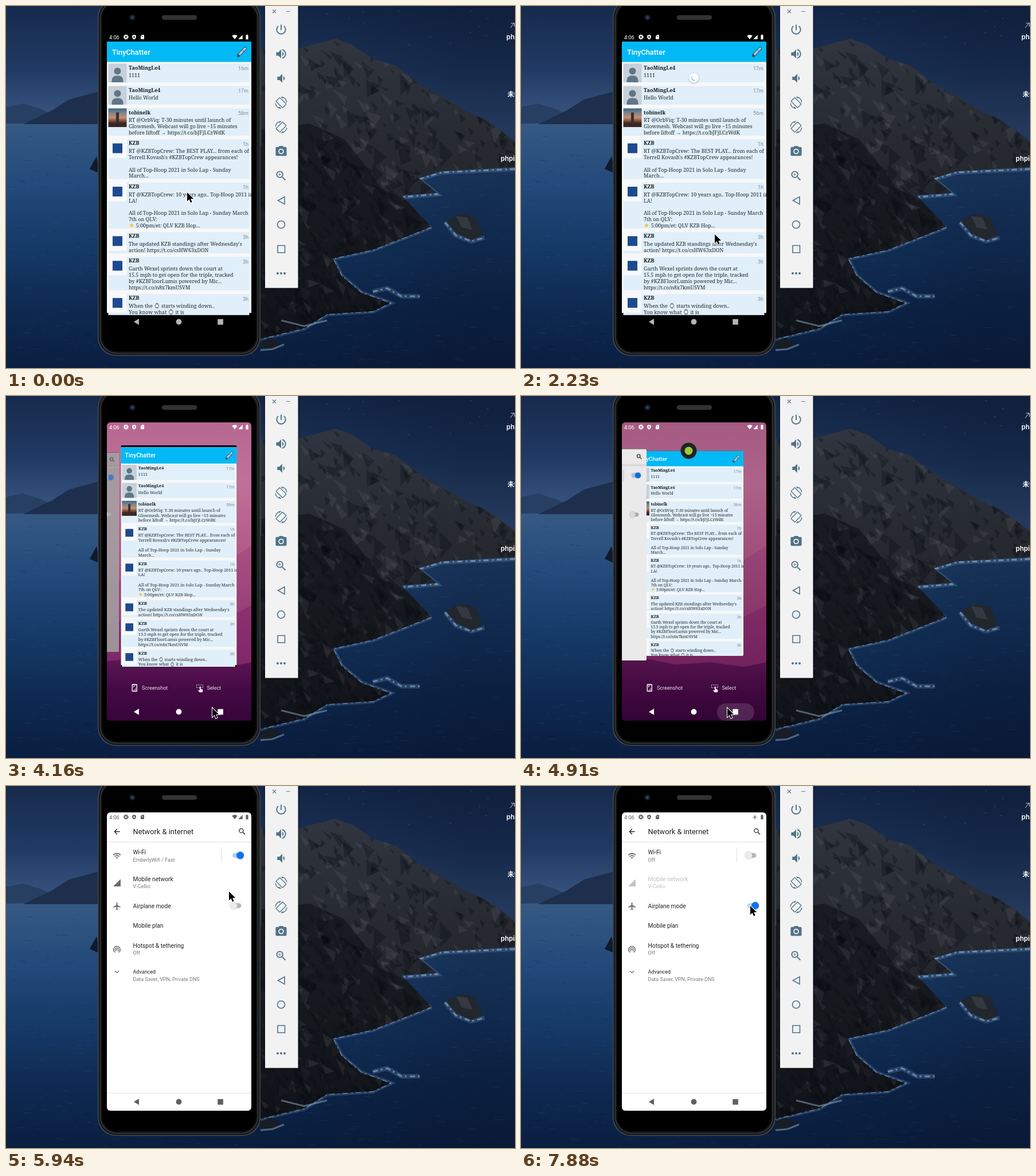
Write an HTML page with a canvas that moves like this. It is 888 px wide and 631 px high and loops after 8 s.

```html
<!DOCTYPE html>
<html lang="en">
<head>
<meta charset="utf-8">
<title>Phone emulator</title>
<style>
html, body { margin: 0; width: 100%; height: 100%; overflow: hidden; background: #0a1f40; }
canvas { display: block; }
</style>
</head>
<body>
<canvas width="888" height="631"></canvas>
<script>
const LOOP = 8000, STEP = 148.3;
const stage = document.querySelector('canvas');
const desktop = new OffscreenCanvas(888, 631);
let g = desktop.getContext('2d');

const SERIF = '"Noto Serif", serif', SANS = 'Roboto, sans-serif';
const ICON = {
  power: 'M13 3h-2v10h2V3zm4.83 2.17l-1.42 1.42C17.99 7.86 19 9.81 19 12c0 3.87-3.13 7-7 7s-7-3.13-7-7c0-2.19 1.01-4.14 2.58-5.42L6.17 5.17C4.23 6.82 3 9.26 3 12c0 4.97 4.03 9 9 9s9-4.03 9-9c0-2.74-1.23-5.18-3.17-6.83z',
  loud: 'M3 9v6h4l5 5V4L7 9H3zm13.5 3c0-1.77-1.02-3.29-2.5-4.03v8.05c1.48-.73 2.5-2.25 2.5-4.02zM14 3.23v2.06c2.89.86 5 3.54 5 6.71s-2.11 5.85-5 6.71v2.06c4.01-.91 7-4.49 7-8.77s-2.99-7.86-7-8.77z',
  quiet: 'M18.5 12c0-1.77-1.02-3.29-2.5-4.03v8.05c1.48-.73 2.5-2.25 2.5-4.02zM5 9v6h4l5 5V4L9 9H5z',
  rotate: 'M16.48 2.52c3.27 1.55 5.61 4.72 5.97 8.48h1.5C23.44 4.84 18.29 0 12 0l-.66.03 3.81 3.81 1.33-1.32zm-6.25-.77c-.59-.59-1.54-.59-2.12 0L1.75 8.11c-.59.59-.59 1.54 0 2.12l12.02 12.02c.59.59 1.54.59 2.12 0l6.36-6.36c.59-.59.59-1.54 0-2.12L10.23 1.75zm4.6 19.44L2.81 9.17l6.36-6.36 12.02 12.02-6.36 6.36zM7.52 21.48C4.25 19.94 1.91 16.76 1.55 13H.05C.56 19.16 5.71 24 12 24l.66-.03-3.81-3.81-1.33 1.32z',
  camera: 'M9 2 7.17 4H4c-1.1 0-2 .9-2 2v12c0 1.1.9 2 2 2h16c1.1 0 2-.9 2-2V6c0-1.1-.9-2-2-2h-3.17L15 2H9zm3 15a5 5 0 1 1 0-10 5 5 0 0 1 0 10zm0-1.8a3.2 3.2 0 1 0 0-6.4 3.2 3.2 0 0 0 0 6.4z',
  search: 'M15.5 14h-.79l-.28-.27A6.47 6.47 0 0 0 16 9.5 6.5 6.5 0 1 0 9.5 16c1.61 0 3.09-.59 4.23-1.57l.27.28v.79l5 4.99L20.49 19l-4.99-5zm-6 0a4.5 4.5 0 1 1 0-9 4.5 4.5 0 0 1 0 9z',
  plus: 'M12 10h-2v2H9v-2H7V9h2V7h1v2h2v1z',
  wifi: 'M1 9l2 2c4.97-4.97 13.03-4.97 18 0l2-2C16.93 2.93 7.08 2.93 1 9zm8 8l3 3 3-3c-1.65-1.66-4.34-1.66-6 0zm-4-4l2 2c2.76-2.76 7.24-2.76 10 0l2-2C15.14 9.14 8.87 9.14 5 13z',
  fan: 'M12 22 0 7a18 18 0 0 1 24 0z',
  signal: 'M2 22h20V2z',
  plane: 'M22 16v-2l-8.5-5V3.5c0-.83-.67-1.5-1.5-1.5s-1.5.67-1.5 1.5V9L2 14v2l8.5-2.5V19L8 20.5V22l4-1 4 1v-1.5L13.5 19v-5.5L22 16z',
  hotspot: 'M12 11a2 2 0 1 0 0 4 2 2 0 0 0 0-4zm6 2a6 6 0 1 0-9 5.19l1-1.74a4 4 0 1 1 4 0l1 1.74A6 6 0 0 0 18 13zM12 3a10 10 0 0 0-5.01 18.65l1-1.73a8 8 0 1 1 8 0l1 1.73A10 10 0 0 0 12 3z',
  back: 'M20 11H7.83l5.59-5.59L12 4l-8 8 8 8 1.41-1.41L7.83 13H20v-2z',
  more: 'M16.59 8.59L12 13.17 7.41 8.59 6 10l6 6 6-6z',
  shield: 'M12 1 3 5v6c0 5.5 3.8 10.7 9 12 5.2-1.3 9-6.5 9-12V5zm0 6 4 5-4 5-4-5z',
  sd: 'M20 2H10L4 8v14h16zM9 7h2v4H9zm4 0h2v4h-2z',
  battery: 'M17 4h-3V2h-4v2H7v18h10z',
  hand: 'M18.84 15.87l-4.54-2.26-1.3-.11v-6a1.5 1.5 0 0 0-3 0v10.74l-3.67-.75-1.58 1.13 4.94 4.94 1.06.44h6.79l1.44-1.28.75-5.27z'
};
const range = n => [...Array(n).keys()];
const shape = (d, color) => { g.fillStyle = color; g.fill(new Path2D(d), 'evenodd'); };
const box = (x, y, w, h, color, r = 0) => {
  g.fillStyle = color; g.beginPath(); g.roundRect(x, y, w, h, r); g.fill();
};
const disc = (x, y, r, color) => box(x - r, y - r, 2 * r, 2 * r, color, r);
const line = (d, color, width = 1) => {
  g.strokeStyle = color; g.lineWidth = width; g.stroke(new Path2D(d));
};
const text = (s, x, y, size, color, font = SANS, weight = 400, align = 'left') => {
  g.font = `${weight} ${size}px ${font}`; g.fillStyle = color; g.textAlign = align;
  g.fillText(s, x, y);
  return g.measureText(s).width;
};
const icon = (name, x, y, size, color, flip = 1) => {
  g.save(); g.translate(x, y); g.scale(flip * size / 24, size / 24); g.translate(-12, -12);
  shape(ICON[name], color); g.restore();
};
const ramp = (y0, y1, ...colors) => {
  const fade = g.createLinearGradient(0, y0, 0, y1);
  colors.forEach((c, i) => fade.addColorStop(i / (colors.length - 1), c));
  return fade;
};
// keys: [step, value, value, ...] with straight runs between them
const track = (n, keys) => {
  const i = keys.findIndex(k => k[0] > n);
  if (i < 0) return keys.at(-1).slice(1);
  const a = keys[Math.max(i - 1, 0)], b = keys[i], u = Math.max(0, (n - a[0]) / (b[0] - a[0]));
  return a.slice(1).map((v, j) => v + (b[j + 1] - v) * u);
};

let seed = 7;
const rnd = (a, b) => (seed = seed * 16807 % 2147483647, a + (b - a) * seed / 2147483647);

function facets(path, count, y0, y1) {
  g.save(); g.clip(new Path2D(path));
  for (const i of range(count)) {
    const x = rnd(440, 888), y = rnd(y0, y1), s = rnd(6, 26);
    shape(`M${x} ${y}l${s} ${rnd(4, s)} ${-rnd(2, s)} ${rnd(3, s)}z`,
      i % 3 ? 'rgba(5,9,16,.28)' : 'rgba(125,125,135,.14)');
  }
  g.restore();
}

function drawDesktop() {
  const shore = '742 385 640 425 570 440 585 470 620 500 670 518 640 532 560 537 520 562 444 580';
  const ridge = `M444 75 509 74 540 66 575 57 605 68 640 92 680 104 720 135 765 160 800 182 840 200 888 236V281L760 288 720 300 752 326 690 330 ${shore}Z`;
  const cliff = `M444 215 530 205 590 232 630 282 655 318 700 340 ${shore}Z`;
  const islet = 'M767 374 795 362 818 368 832 400 812 408 785 396Z';
  box(0, 0, 888, 300, ramp(0, 215, '#162a4c', '#213a63', '#3d5a86'));
  shape('M0 176 30 170 62 180 82 190 60 204 0 205Z', '#263f63');
  shape('M30 206 80 182 110 163 165 148V216H100Z', '#1d2f4c');
  const sea = ramp(200, 631, '#375a84', '#234a7a', '#163a68', '#0e2a51', '#0a1e40');
  box(0, 206, 450, 425, sea);
  box(440, 275, 448, 356, sea);
  const shade = g.createLinearGradient(250, 0, 800, 0);
  shade.addColorStop(0, 'rgba(8,20,44,0)'); shade.addColorStop(1, 'rgba(8,20,44,.48)');
  box(0, 0, 888, 631, shade);
  for (const i of range(650)) {
    const y = rnd(225, 631), x = rnd(0, 888), w = rnd(3, 14);
    if (x < 450 || y > 300) box(x, y, w, 1, i % 2 ? 'rgba(110,150,195,.11)' : 'rgba(3,14,36,.16)');
  }
  for (const i of range(14)) box(rnd(520, 880), rnd(3, 70), 1, 1, 'rgba(210,220,240,.5)');

  const surf = ['M888 284 760 290 720 302 752 328 692 333', 'M' + shore, 'M766 377 785 400 812 410 835 404', 'M640 498 665 492 690 506 722 506'];
  for (const d of surf) {
    line(d, 'rgba(105,145,185,.28)', 8);
    g.setLineDash([9, 5, 3, 6]); line(d, 'rgba(165,190,215,.55)', 3); g.setLineDash([]);
  }
  shape(ridge, ramp(60, 580, '#30353f', '#272a31', '#202329', '#14181f'));
  facets(ridge, 650, 60, 580);
  shape(cliff, 'rgba(13,15,20,.55)');
  facets(cliff, 420, 205, 580);
  shape(islet, '#22262d');
  shape('M785 366 805 369 814 390 795 386Z', '#333841');
  shape('M444 585 462 578 480 588 462 599 444 596Z', '#171c25');
  line('M444 600 465 598 485 590M480 548 520 558 560 548', 'rgba(160,188,212,.45)', 3);
  shape('M146 284 158 262 164 292Z', '#101a2a');

  const label = (s, x, y) => text(s, x, y, 11.5, '#fff', 'Inter, "Noto Sans CJK SC", sans-serif', 600);
  label('ph', 873, 58); label('未命', 875, 158); label('phpi', 863, 270);
  line('M880 38 886 30M881 30h6v6', '#c9ced6');
  drawPhoneBody();
  drawToolbar();
}

function drawPhoneBody() {
  box(443, 128, 2.5, 28, '#34373b', 1);
  box(443, 188, 2.5, 56, '#34373b', 1);
  box(160, -12, 284, 622, '#46494e', 32);
  box(161.5, -11, 281, 619.5, '#17191c', 31);
  box(164, -8, 276, 614, '#34373b', 29);
  box(165.5, -7, 273, 611.5, '#0e0f11', 28);
  box(168, -5, 268, 607, '#000', 26);
  box(272, 16, 61, 8, '#343132', 4);
  disc(220.5, 20, 5, '#18202b'); disc(220.5, 20, 2.2, '#30465e');
}

function drawToolbar() {
  const ink = '#4f7388';
  g.shadowColor = 'rgba(0,0,0,.4)'; g.shadowBlur = 5;
  box(452, -5, 57.5, 496.5, '#f2f2f3');
  g.shadowBlur = 0; g.shadowColor = 'transparent';
  line('M465 6.5l6 6m0-6-6 6M489 9.5h7', '#64808f', 1.2);
  ['power', 'loud', 'quiet', 'rotate', 'rotate', 'camera', 'search'].forEach((name, i) =>
    icon(name, 480, 41 + 42.5 * i, i == 3 || i == 4 ? 21 : 23, ink, i == 4 ? -1 : 1));
  icon('plus', 480, 296, 23, ink);
  line('M474.5 339 486 332.5V345.5ZM486.5 381a6.5 6.5 0 1 0-13 0 6.5 6.5 0 0 0 13 0M474 417.5h12.5v12.5H474z', ink, 1.6);
  for (const x of [474, 480, 486]) disc(x, 466, 2, ink);
}

function statusBar(color, airplane) {
  text('4:06', 180, 57.5, 9.2, color);
  g.setLineDash([1.5, 1.1]);
  line('M213 54a3.7 3.7 0 1 0-7.4 0 3.7 3.7 0 0 0 7.4 0', color, 1.6);
  g.setLineDash([]);
  line('M211.7 54a2.4 2.4 0 1 0-4.8 0 2.4 2.4 0 0 0 4.8 0', color, 1.6);
  icon('shield', 223.5, 54, 9, color);
  icon('sd', 238, 54, 9, color);
  if (airplane) icon('plane', 408, 54, 9, color);
  else { icon('fan', 399, 54, 9.5, color); icon('signal', 409, 54, 9, color); }
  icon('battery', 420.5, 54, 10, color);
}

function navBar(color) {
  shape('M223 550.5 232 545V556Z', color);
  disc(301.5, 550.5, 4.9, color);
  box(369.3, 545.8, 9.6, 9.6, color, .5);
}

const AVATARS = {
  person(y) {
    box(178.5, y, 32, 32.5, '#c7d1d9');
    g.save(); g.beginPath(); g.rect(178.5, y, 32, 32.5); g.clip();
    disc(194.5, y + 13, 6, '#5f7688');
    box(184.5, y + 21, 20, 20, '#5f7688', 8);
    g.restore();
  },
  photo(y) {
    box(178.5, y, 32, 32.5, ramp(y, y + 32, '#3c6788', '#7d8590', '#c98d6b', '#5a3a33', '#33231f'));
    box(192, y + 7, 5, 20, '#3a302f');
    box(179, y + 25, 31, 7, '#3c2823');
  },
  team(y) {
    box(178.5, y, 32, 32.5, '#f7f9fb');
    box(186, y + 7, 17, 17, '#1d4a8f');
  }
};
const POSTS = [
  ['TaoMingLe4', 'person', '17m', '1111'],
  ['TaoMingLe4', 'person', '17m', 'Hello World'],
  ['tobinelk', 'photo', '56m', 'RT @OrbViq: T-30 minutes until launch of', 'Glowmesh. Webcast will go live ~15 minutes', 'before liftoff → https://t.co/bJFjLCzWdK'],
  ['KZB', 'team', '1h', 'RT @KZBTopCrew: The BEST PLAY... from each of', "Terrell Kovash's #KZBTopCrew appearances!", '', 'All of Top-Hoop 2021 in Solo Lap - Sunday', 'March...'],
  ['KZB', 'team', '1h', 'RT @KZBTopCrew: 10 years ago.. Top-Hoop 2011 in', 'LA!', '', 'All of Top-Hoop 2021 in Solo Lap - Sunday March', '7th on QLV:', '★ 5:00pm/et: QLV KZB Hop...'],
  ['KZB', 'team', '3h', "The updated KZB standings after Wednesday's", 'action! https://t.co/csHW63xDON'],
  ['KZB', 'team', '3h', 'Garth Wexel sprints down the court at', '15.5 mph to get open for the triple, tracked', 'by #KZBFloorLumis powered by Mic...', 'https://t.co/n8x7kmUSVM'],
  ['KZB', 'team', '3h', 'When the ⌚ starts winding down..', 'You know what ⌚ it is']
];

function postLine(s, x, y) {
  for (const part of s.split(/([★⌚])/)) {
    if (part == '★') x += text(part, x, y, 11.5, '#f7c52d', '"DejaVu Sans", sans-serif');
    else if (part == '⌚') {
      box(x + 3, y - 8, 4.5, 9.5, '#8b8f94', 1);
      disc(x + 5.2, y - 3.2, 3.7, '#74797e'); disc(x + 5.2, y - 3.2, 2.6, '#f2f2f2');
      x += 10.5;
    } else x += text(part, x, y, 9, '#23282c', SERIF);
  }
}

function drawFeed(n) {
  box(176, 62, 252, 473, '#f7f8f9');
  let y = 100.5;
  for (const [i, [name, avatar, age, ...lines]] of POSTS.entries()) {
    const pitch = Math.max(39, 32.3 + 10.8 * (lines.length - 1));
    box(178.5, y, 246, pitch - 6.4, '#e0eff9');
    AVATARS[avatar](y);
    text(name, 214, y + 10, 9, '#15191c', SERIF, 700);
    text(i || n >= 14 ? age : '16m', 423, y + 11.5, 9, '#7d8b95', SANS, 400, 'right');
    lines.forEach((s, k) => postLine(s, 214, y + 23.8 + 10.8 * k));
    y += pitch;
  }
  const [cy, r] = track(n, [[5, 90, 0], [6, 113, 12.8], [7, 135, 12.8], [8, 148, 12.8], [10, 148, 12.8], [12, 125.6, 12.8], [14, 125.6, 12.8], [15, 125.6, 8.5], [16, 125.6, 3], [17, 125.6, 0]]);
  if (r > 0) {
    g.shadowColor = 'rgba(0,0,0,.3)'; g.shadowBlur = 3; g.shadowOffsetY = 1;
    disc(301.5, cy, r, '#fdfdfd');
    g.shadowColor = 'transparent'; g.shadowBlur = g.shadowOffsetY = 0;
    g.strokeStyle = '#17c0e8'; g.lineWidth = .13 * r;
    g.beginPath(); g.arc(301.5, cy, .45 * r, n * 2 - 29, n * 2 - 26.2); g.stroke();
  }
  box(176, 62, 252, 35.5, '#03b9f5');
  text('TinyChatter', 185, 84.5, 12.8, '#fff', SANS, 500);
  g.lineCap = 'round';
  line('M406 86 417 74', '#31536a', 6); line('M406 86 417 74', '#9fc9dd', 4);
  line('M413 77l3 3', '#31536a', 1);
  g.lineCap = 'butt';
  shape('M403 89l2-6 4 4z', '#40515c');
}

function toggle(on, y) {
  box(on ? 395 : 391, y - 4.3, 19.5, 8.6, on ? '#aed3fb' : '#b8b8b8', 4.3);
  g.shadowColor = 'rgba(0,0,0,.35)'; g.shadowBlur = 2;
  disc(on ? 408.7 : 397.3, y, 6.4, on ? '#0b74ec' : '#ececec');
  g.shadowColor = 'transparent'; g.shadowBlur = 0;
}

function drawSettings(n) {
  const off = n >= 49, ink = '#212121', soft = '#7b7b7b', faint = '#c2c2c2';
  const row = (name, title, y, sub, dim) => {
    if (name) icon(name, 193.5, sub && name != 'more' ? y + 3 : y - 3, 15.4, dim ? faint : '#6b6b6b');
    text(title, 221.5, y, name == 'more' ? 9 : 10.26, dim ? faint : ink);
    if (sub) text(sub, 221.5, y + 12.8, 9, dim ? faint : soft);
  };
  box(176, 62, 252, 473, '#fff');
  if (n >= 47 && n < 50) box(176, 190, 252, 36, n < 49 ? '#e6e6e6' : '#f3f3f3');
  icon('back', 193.5, 79.5, 15.4, ink);
  text('Network & internet', 221.5, 84.3, 12.8, ink);
  icon('search', 412, 79.5, 15.4, ink);
  box(176, 97.3, 252, 1, '#e2e2e2');
  row('wifi', 'Wi-Fi', 118.7, off ? 'Off' : 'EmberlyWifi / Fast');
  box(375.8, 108, .9, 26, '#dedede');
  toggle(!off, 121);
  row('signal', 'Mobile network', 165.6, 'V-Cellio', off);
  row('plane', 'Airplane mode', 212.5);
  toggle(n >= 48, 208.5);
  row('', 'Mobile plan', 247);
  row('hotspot', 'Hotspot & tethering', 281.6, 'Off');
  row('more', 'Advanced', 327, 'Data Saver, VPN, Private DNS');
}

// A window shrinks round its content, with black bars of height pad above and below
function card(draw, n, scale, cx, pad = 0) {
  g.save();
  g.translate(cx - 302 * scale, 62 + (1 - scale) * 138 - 62 * scale);
  g.scale(scale, scale);
  g.beginPath(); g.roundRect(176, 62 - pad, 252, 473 + 2 * pad, scale < 1 ? 3 : 0); g.clip();
  box(176, 40, 252, 530, '#000');
  draw(n);
  g.restore();
}

const press = color => box(342, 535.5, 65, 31, color, 15.5);

function drawOverview(n) {
  box(176, 46, 252, 520, ramp(46, 470, '#b76891', '#c07099', '#b45d8a', '#a04a7d', '#85346c'));
  shape('M176 330 250 300 330 320 428 262V480H176Z', 'rgba(135,40,110,.25)');
  shape('M176 400 260 375 350 405 428 365V480H176Z', 'rgba(115,20,95,.35)');
  shape('M176 462 220 458 270 468 330 464 390 472 428 464V566H176Z', ramp(458, 566, '#5d1655', '#450a45', '#36053a'));
  box(176, 46, 252, 520, `rgba(35,0,30,${track(n, [[28, 0], [31, .12]])[0]})`);
  const [scale, cx, pad] = track(n, [[25, 1, 302, 16], [26, .95, 302, 12], [28, .803, 301.5, 4], [30, .755, 301.5, 0], [32, .755, 301.5, 0], [33, .755, 293, 0], [34, .75, 310, 0]]);
  const [size, right, alpha] = track(n, [[25, .72, 172, 0], [28, .736, 197, .55], [30, .755, 199, 1], [32, .755, 199, 1], [33, .78, 219, 1], [34, .9, 335, 1]]);
  const icons = track(n, [[25, 0], [27, 1]])[0];
  g.globalAlpha = icons;
  text('Screenshot', 237, 512, 9, '#e9dde8');
  text('Select', 350.5, 512, 9, '#e9dde8');
  box(219.5, 502, 9.5, 13.5, '#eadfea', 1.5); box(221, 504, 6.5, 9.5, '#42133f');
  line('M222.5 508v-2.5h2.5M226 509.5v2.5h-2.5', '#eadfea');
  g.setLineDash([1.5, 1.2]); line('M332.5 503.5h11v5h-11z', '#eadfea'); g.setLineDash([]);
  icon('hand', 339, 509.5, 14, '#f4ecf4');
  g.globalAlpha = 1;
  card(drawFeed, n, scale, cx, pad);
  g.globalAlpha = alpha;
  g.shadowColor = 'rgba(0,0,0,.35)'; g.shadowBlur = 3;
  card(drawSettings, n, size, right - 126 * size);
  g.shadowColor = 'transparent'; g.shadowBlur = 0;
  g.globalAlpha = 1;
  if (n >= 32 && n < 34) box(176, 92, right - 176, 369, 'rgba(60,50,50,.1)');
  if (n >= 29 && n < 34) { disc(cx - .5, 95.5, 14, '#1d2424'); disc(cx - .5, 95.5, 7, '#9bc837'); }
  statusBar('#fff');
  if (n >= 32) press('rgba(255,255,255,.13)');
  navBar('#fff');
}

function drawScreen(n) {
  g.save();
  g.beginPath(); g.roundRect(176, 46, 252, 520, 6); g.clip();
  if (n < 25 || n >= 35) {
    const app = n < 25;
    box(176, 46, 252, 520, app ? '#000' : '#fff');
    (app ? drawFeed : drawSettings)(n);
    if (!app) box(176, 535, 252, 1, '#e6e6e6');
    statusBar(app ? '#fff' : '#5f6265', n >= 49);
    navBar(app ? '#b4b4b4' : '#5d5f61');
  } else drawOverview(n);
  g.restore();
}

function drawPointer(n) {
  const [x, y] = track(n, [[5, 316, 325], [6, 315, 400], [8, 310, 559], [11, 311, 558], [13, 316, 510], [15, 338, 398], [16, 346, 425], [18, 362, 511], [20, 361, 533], [22, 360, 544], [35, 360, 544], [37, 372, 330], [39, 384, 189], [40, 389, 184], [41, 389, 184], [44, 400, 209]]);
  const arrow = 'M0 0v15.5l3.6-3.4 2.4 5.6 2.6-1.1-2.4-5.5h5z';
  g.save(); g.translate(x, y);
  line(arrow, '#fff', 2); shape(arrow, '#000');
  g.restore();
}

drawDesktop();
g = stage.getContext('2d');
function tick() {
  const n = Math.floor(performance.now() % LOOP / STEP);
  g.drawImage(desktop, 0, 0);
  drawScreen(n);
  drawPointer(n);
  requestAnimationFrame(tick);
}
tick();
</script>
</body>
</html>
```
